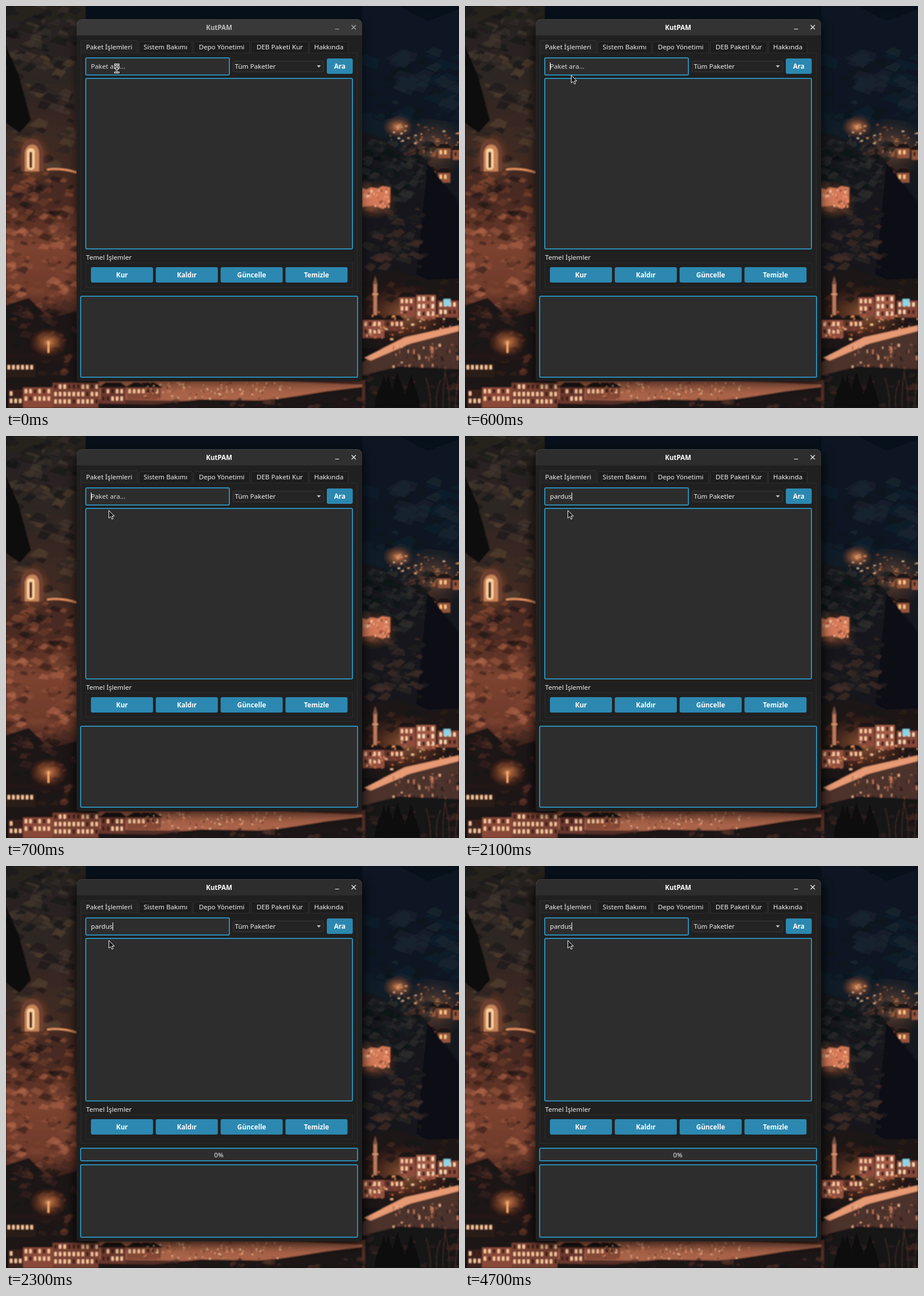
An HTML page that plays this animation: 795 px wide and 705 px high, repeating every 8000 ms.

```html
<!DOCTYPE html>
<html lang="tr">
<head>
<meta charset="utf-8">
<title>KutPAM</title>
<style>
  html, body { margin: 0; width: 100%; height: 100%; overflow: hidden; background: #0b0f14; }
  svg { display: block; width: 795px; height: 705px; }
  text { font: 11.65px "Noto Sans", "Open Sans", sans-serif; fill: #f0f0f0; white-space: pre; }
  .bold { font-weight: 700; fill: #fff; text-anchor: middle; }
  .mid { text-anchor: middle; }
  .field { fill: #2d2d2d; stroke: #2b8bb3; stroke-width: 2; }
  .thin { fill: none; stroke: #2c2c2c; }
</style>
</head>
<body>
<svg id="stage" viewBox="0 0 795 705" xmlns="http://www.w3.org/2000/svg">
  <defs>
    <linearGradient id="sky" x1="0" y1="0" x2="0" y2="1">
      <stop offset="0" stop-color="#07101a"/><stop offset=".28" stop-color="#0f1d29"/>
      <stop offset=".45" stop-color="#15191e"/><stop offset="1" stop-color="#130f11"/>
    </linearGradient>
    <linearGradient id="cliff" x1="0" y1="0" x2="0" y2="1">
      <stop offset="0" stop-color="#25211f"/><stop offset=".2" stop-color="#302723"/>
      <stop offset=".38" stop-color="#412a22"/><stop offset=".5" stop-color="#4d2b22"/>
      <stop offset=".6" stop-color="#7c4330"/><stop offset=".72" stop-color="#6e3a2b"/>
      <stop offset=".79" stop-color="#281918"/><stop offset="1" stop-color="#151011"/>
    </linearGradient>
    <radialGradient id="glow">
      <stop offset="0" stop-color="#ffc48a"/><stop offset=".2" stop-color="#f08a4c" stop-opacity=".75"/>
      <stop offset="1" stop-color="#c05028" stop-opacity="0"/>
    </radialGradient>
    <filter id="soft" x="-20%" y="-20%" width="140%" height="140%"><feGaussianBlur stdDeviation="1.1"/></filter>
    <filter id="blur" x="-20%" y="-20%" width="140%" height="140%"><feGaussianBlur stdDeviation="9"/></filter>
  </defs>
  <g id="photo"></g>
  <rect x="126" y="28" width="497" height="632" rx="10" filter="url(#blur)" opacity=".45"/>
  <rect id="shadow" x="119" y="26" width="511" height="640" rx="14" filter="url(#blur)"/>
  <g id="window"></g>
</svg>
<script>
const $ = id => document.getElementById(id);

let seed = 11;
const rnd = (a = 0, b = 1) => {
  seed = (seed * 16807) % 2147483647;
  return a + (b - a) * seed / 2147483647;
};
const pick = list => list[Math.floor(rnd(0, list.length))];
const repeat = (n, fn) => Array.from({ length: n }, (_, i) => fn(i)).join('');

const box = (x, y, w, h, attrs = '') => `<rect x="${x}" y="${y}" width="${w}" height="${h}" ${attrs}/>`;
const poly = (points, fill, attrs = '') => `<polygon points="${points}" fill="${fill}" ${attrs}/>`;
const label = (x, y, str, attrs = '') => `<text x="${x}" y="${y}" ${attrs}>${str}</text>`;
const button = (x, y, w, str) =>
  box(x, y, w, 27, 'rx="3" fill="#2c88b0"') + label(x + w / 2, y + 17.5, str, 'class="bold"');
const glow = (x, y, rx, ry, o = 1) =>
  `<ellipse cx="${x}" cy="${y}" rx="${rx}" ry="${ry}" fill="url(#glow)" opacity="${o}"/>`;

// Jagged slanted facets inside an area
function rock(n, x0, y0, x1, y1, colors, size = 10) {
  return repeat(n, () => {
    const x = rnd(x0, x1), y = rnd(y0, y1), s = rnd(size * .4, size * 1.3);
    const p = [[-s, rnd(-3, 3)], [rnd(-s, s) / 2, -s * .7], [s, -s * .3], [rnd(0, s), s * .5]];
    return poly(p.map(q => (x + q[0]).toFixed(1) + ',' + (y + q[1]).toFixed(1)).join(' '), pick(colors), 'opacity=".6"');
  });
}

function lights(n, x0, y0, x1, y1, colors, w = 3, h = 3) {
  return repeat(n, () => box(rnd(x0, x1).toFixed(1), rnd(y0, y1).toFixed(1),
    rnd(1, w).toFixed(1), rnd(1, h).toFixed(1), `fill="${pick(colors)}"`));
}

function house(x, y, w, h, wall, lit = '#ffc9a0') {
  const cols = Math.floor(w / 8), rows = Math.floor(h / 13);
  return box(x, y, w, h, `fill="${wall}"`) +
    poly(`${x - 4},${y + 1} ${x + w * .2},${y - 8} ${x + w * .8},${y - 8} ${x + w + 4},${y + 1}`, '#1d1415') +
    repeat(cols * rows, i => box(x + 3 + (i % cols) * 8, y + 4 + Math.floor(i / cols) * 13, 4, 7,
      `fill="${rnd() < .7 ? lit : '#3a1d18'}"`));
}

const tree = (x, base, h) =>
  poly(`${x},${base - h} ${x + h * .17},${base - h * .4} ${x + h * .22},${base} ${x - h * .22},${base} ${x - h * .17},${base - h * .4}`, '#0c0d0e');

function photo() {
  const warm = ['#ffd0a0', '#f09a5c', '#c8623a', '#8e422a'];
  const ember = ['#9a573d', '#b0664a', '#5a3025', '#341d19', '#7c4230'];
  const left = box(0, 0, 140, 705, 'fill="url(#cliff)"') +
    rock(60, 0, 0, 124, 110, ['#121416', '#38302b', '#1b1a1a', '#443830'], 14) +
    rock(60, 0, 90, 124, 290, ['#4a3a31', '#19181a', '#2b2422', '#57422f'], 14) +
    poly('0,70 22,120 44,200 24,222 0,205', '#0b0e11') +
    rock(70, 0, 290, 124, 375, ['#6c3b2a', '#2a1a18', '#8a4c34', '#1d1516']) +
    rock(120, 0, 365, 124, 525, ember) +
    poly('0,525 40,512 75,548 124,535 124,610 0,610', '#1d1415') +
    rock(45, 0, 520, 124, 610, ['#3a2420', '#161213', '#4e2d23']);
  const alcove = glow(46, 266, 34, 46, .55) +
    '<path d="M27 290V252Q31 233 46 233Q62 234 65 256V290Z" fill="#6e4030"/>' +
    '<path d="M33 290V256Q36 243 47 243Q57 244 58 258V290Z" fill="#c68458"/>' +
    box(37, 250, 13, 37, 'rx="5" fill="#ffd4a0"') + box(41, 256, 5, 28, 'fill="#54281c"') +
    '<path d="M72 287Q96 283 124 292" fill="none" stroke="#f39a65" stroke-width="3"/>';
  const village = house(0, 626, 52, 25, '#2c1b18') + house(4, 672, 26, 33, '#3a211c') +
    house(30, 668, 52, 37, '#8a4a38') + house(82, 660, 80, 45, '#783f31') +
    glow(74, 590, 34, 26, .8) + box(73, 588, 3, 20, 'fill="#ffb070"') +
    rock(18, 60, 600, 124, 645, ['#6a3a29', '#1a1314', '#331f1b'], 8);
  const shore = box(124, 656, 506, 49, 'fill="#532d25"') +
    poly('160,658 480,658 625,664 625,674 420,694 160,690', '#a96349') +
    house(134, 668, 30, 32, '#744033') + house(166, 668, 44, 30, '#6c392d') + house(212, 668, 60, 22, '#864936') +
    lights(150, 235, 658, 500, 688, ['#ffd3a8', '#f4a77c', '#d77b50', '#5f2e24']) +
    poly('124,705 160,697 260,699 340,690 460,692 560,676 625,668 625,705', '#1c1617') +
    rock(35, 290, 690, 640, 705, ['#2a1d1c', '#111214', '#53332a'], 7) + box(110, 684, 9, 9, 'fill="#79d3e4"');
  const far = poly('625,0 690,0 740,26 795,5 795,205 625,185', '#0c1722') +
    rock(45, 630, 80, 795, 195, ['#142330', '#0b131b', '#182630'], 18) +
    glow(688, 212, 27, 20, .9) + glow(750, 250, 60, 55, .4) +
    lights(105, 672, 206, 795, 262, warm.concat('#34221f'), 5) +
    repeat(5, i => house(732 + i % 3 * 26, 246 + Math.floor(i / 3) * 34 + i * 3, 22, 18, '#94553a', '#ffc788'));
  const bluff = poly('625,222 662,232 704,264 740,276 768,322 795,345 795,490 625,500', '#15181c') +
    rock(110, 628, 240, 745, 340, ['#282a2d', '#0d1014', '#1b1e22', '#34302f'], 11) +
    poly('740,275 795,345 795,510 720,470', '#0d1116') +
    rock(75, 628, 350, 735, 465, ['#30292a', '#171719', '#4a302a', '#23201f'], 11) +
    glow(645, 340, 42, 35, .65) +
    poly('625,319 633,322 640,318 653,320 660,316 674,318 674,344 662,356 646,350 625,352', '#d47a58') +
    lights(32, 626, 320, 672, 352, ['#ffc4a0', '#8e422f', '#f29870'], 4, 6);
  const town = poly('625,470 680,462 740,480 795,478 795,600 625,600', '#1b1415') +
    glow(700, 540, 80, 55, .55) +
    rock(35, 628, 480, 795, 540, ['#31201d', '#141315', '#4b2a22'], 8) +
    box(645, 488, 6, 55, 'fill="#bd7a5d"') + poly('644,488 648,473 652,488', '#7a5147') +
    box(643, 504, 10, 3, 'fill="#d89672"') +
    house(690, 510, 28, 34, '#8d4c3c') + house(720, 506, 34, 43, '#a35b46', '#ffe0c2') +
    house(758, 516, 37, 30, '#854738', '#ffd9b4') + house(626, 550, 38, 32, '#925040') +
    house(665, 550, 32, 20, '#6a392e') + box(768, 514, 12, 12, 'fill="#8ed4e4"') +
    lights(100, 628, 535, 795, 590, warm.concat('#40211d', '#231615'), 6, 4);
  const river = poly('625,625 690,585 795,566 795,642 700,648 625,660', '#4b302b') +
    poly('628,617 700,581 795,560 795,570 710,592 640,622', '#e79a73') +
    lights(85, 675, 592, 795, 640, ['#c77b5b', '#ebb08d', '#573530', '#2a2324', '#8a5342'], 4, 9) +
    poly('625,648 690,632 795,637 795,705 625,705', '#191416') +
    rock(40, 628, 645, 795, 705, ['#30201e', '#101214', '#4a2c25'], 9) +
    repeat(9, i => tree(655 + i * 8, 705, rnd(34, 64))) + tree(540, 705, 38) + tree(492, 705, 20) +
    repeat(5, i => `<path d="M${745 + i * 11} 705q${rnd(-4, 4)} -25 ${rnd(-9, 9)} -${rnd(45, 75)}" fill="none" stroke="#563730"/>`);
  return box(0, 0, 795, 705, 'fill="url(#sky)"') +
    `<g filter="url(#soft)">${left}${far}${bluff}${town}${river}${shore}${village}${alcove}</g>`;
}

function tab(x, w, str, active) {
  const y = active ? 60.5 : 62.5;
  return `<path d="M${x + .5} 82V${y + 2}q0 -2 2 -2H${x + w - 2.5}q2 0 2 2V82" fill="${active ? '#242424' : '#1d1d1d'}" stroke="#303030"/>` +
    label(x + w / 2, active ? 75.5 : 76, str, 'class="mid"');
}

function windowUi() {
  return '<path d="M124 658V33q0 -10 10 -10H615q10 0 10 10V652q0 6 -6 6H130q-6 0 -6 -6Z" fill="#202020"/>' +
    '<path id="bar" d="M124 51.500V33q0 -10 10 -10H615q10 0 10 10V51.500Z"/>' +
    '<path d="M125 32q1 -8.500 9 -8.500H615q8 0 9 8.500" fill="none" stroke="#484848" stroke-opacity=".7"/>' +
    label(374, 41.5, 'KutPAM', 'id="title" class="bold"') +
    '<path id="icons" d="M577.500 40.500h7M606.500 33.500l7.500 7.500m0 -7.500l-7.500 7.500" fill="none" stroke-width="1.200"/>' +
    box(131.5, 82.500, 485, 418, 'id="pane" class="thin"') +
    tab(233, 94, 'Sistem Bakımı') + tab(329, 99, 'Depo Yönetimi') +
    tab(430, 101, 'DEB Paketi Kur') + tab(532, 69, 'Hakkında') + tab(131, 100, 'Paket İşlemleri', true) +
    box(140, 91, 252, 30, 'rx="2" class="field"') +
    label(149, 110, '', 'id="query"') + box(149, 99, 1, 14, 'id="caret" fill="#fff"') +
    box(398.5, 96.500, 159, 19, 'rx="2" fill="#242424" stroke="#393939"') +
    label(401.5, 110, 'Tüm Paketler') + poly('545.5,104 552.5,104 549,108', '#c4c4c4') +
    button(563, 92, 45.5, 'Ara') +
    box(140, 127, 468, 299, 'id="list" rx="2" class="field"') +
    '<g id="actions">' + label(140.5, 445, 'Temel İşlemler') +
    box(140.5, 450.500, 468, 43, 'class="thin"') +
    ['Kur', 'Kaldır', 'Güncelle', 'Temizle'].map((s, i) => button(149 + i * 113.8, 458, 109, s)).join('') + '</g>' +
    '<g id="progress">' + box(131, 495, 486, 22, 'rx="2" class="field"') + label(373.5, 511, '0%', 'class="mid"') + '</g>' +
    box(131, 509, 486, 142, 'id="log" rx="2" class="field"') +
    '<g id="beam" fill="none" stroke-linecap="square"><path d="M191.500 102.500h2l1 1l1 -1h2M194.500 103.500V115.500M191.500 116.500h2l1 -1l1 1h2M192.500 109.500h4" stroke="#eee" stroke-width="3"/>' +
    '<path d="M191.500 102.500h2l1 1l1 -1h2M194.500 103.500V115.500M191.500 116.500h2l1 -1l1 1h2M192.500 109.500h4" stroke="#111"/></g>' +
    '<path id="arrow" d="M180.500 130.500V144l3.200 -2.700l2.300 4.700l2.200 -1.100l-2.200 -4.500h4.200Z" fill="#151515" stroke="#f2f2f2"/>';
}

$('photo').innerHTML = photo();
$('window').innerHTML = windowUi();

const LOOP = 8000;
// start time, text, caret position
const typing = [[0, '', 149], [1300, 'p', 156], [1400, 'pa', 163], [1700, 'par', 167], [1900, 'pardu', 181], [2100, 'pardus', 187]];
const set = (id, attrs) => {
  for (const k in attrs) $(id).setAttribute(k, attrs[k]);
};
const show = (id, on) => set(id, { visibility: on ? 'visible' : 'hidden' });

function update(t) {
  const focused = t >= 500;
  const fade = Math.min(1, Math.max(0, (Math.floor(t / 100) - 4) / 4));
  const grey = Math.round(57 - 12 * fade);
  set('bar', { fill: `rgb(${grey},${grey},${grey})` });
  set('shadow', { opacity: .12 + .38 * fade });
  $('title').style.fill = focused ? '#fff' : '#bdbdbd';
  set('icons', { stroke: focused ? '#f2f2f2' : '#b0b0b0' });

  const [, str, x] = typing.filter(s => t >= s[0]).pop();
  const shown = str || 'Paket ara...';
  if ($('query').textContent !== shown) $('query').textContent = shown;
  $('query').style.fill = str ? '#f0f0f0' : '#dcdcdc';
  set('caret', { x });
  show('caret', focused && !(t >= 1100 && t < 1300) && !(t >= 4600 && t < 4700));

  show('beam', t < 600);
  show('arrow', t >= 600);
  set('arrow', { transform: t < 700 ? 'translate(6 -9)' : '' });

  const busy = t >= 2300, lift = busy ? 14 : 0;
  show('progress', busy);
  set('pane', { height: 418 - lift });
  set('list', { height: 299 - lift });
  set('actions', { transform: `translate(0 ${-lift})` });
  set('log', { y: busy ? 524 : 509, height: busy ? 127 : 142 });
}

const start = performance.now();
function tick() {
  update((performance.now() - start) % LOOP);
  requestAnimationFrame(tick);
}
tick();
</script>
</body>
</html>
```
